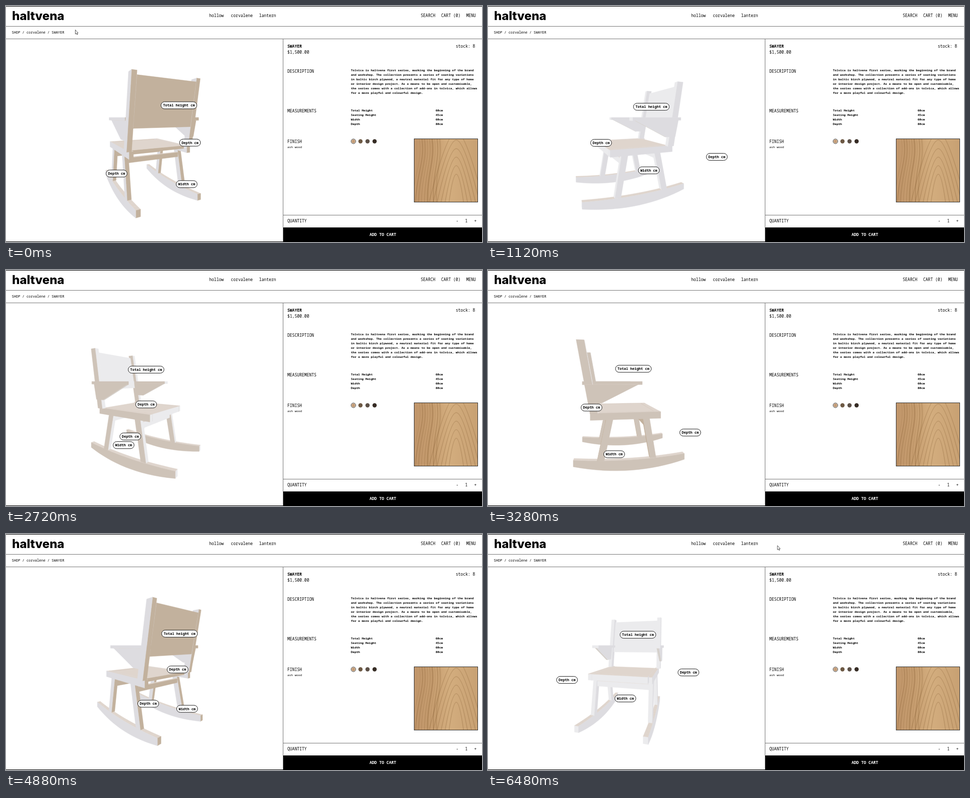
These frames come from a looping animation (944x470 px, 6.56 s). An HTML page:

```html
<!DOCTYPE html>
<html lang="en">
<head>
<meta charset="utf-8">
<title>haltvena</title>
<style>
  html, body { margin: 0; width: 100%; height: 100%; overflow: hidden; background: #fff; }
  svg { display: block; width: 944px; height: 470px; }
  text { font-family: "Noto Sans Mono", "DejaVu Sans Mono", monospace; }
  #logo { font: 800 24px Inter, sans-serif; letter-spacing: -0.1px; }
  #chair path { stroke-width: .5; stroke-linejoin: round; }
  #tags rect { fill: #fff; stroke: #222; }
</style>
</head>
<body>
<svg viewBox="0 0 944 470">
  <defs>
    <linearGradient id="wood">
      <stop offset="0" stop-color="#c0956a"/>
      <stop offset=".3" stop-color="#c79e70"/>
      <stop offset=".55" stop-color="#d3ad7e"/>
      <stop offset="1" stop-color="#c8a173"/>
    </linearGradient>
    <clipPath id="board"><rect x="810" y="265" width="125" height="125"/></clipPath>
  </defs>
  <g id="page">
    <path d="M0 .5H944M0 469.5H944" stroke="#000"/>
    <path d="M0 40.5H944M0 65.5H944M549.5 66V469M550 416.5H944" stroke="#777"/>
    <rect x="550" y="441" width="394" height="29"/>
    <text id="logo" x="12" y="28">haltvena</text>
    <rect x="810" y="265" width="125" height="125" fill="url(#wood)"/>
    <g id="grain" clip-path="url(#board)" fill="none" stroke="#80592f"/>
    <rect x="809.5" y="264.5" width="126" height="126" fill="none" stroke="#333"/>
    <circle cx="689" cy="269.5" r="4.7" fill="none" stroke="#333" stroke-width=".9"/>
    <circle cx="689" cy="269.5" r="3.7" fill="#c49d78"/>
    <circle cx="703" cy="269.5" r="4.2" fill="#6d5944"/>
    <circle cx="717" cy="269.5" r="4.2" fill="#5c5047"/>
    <circle cx="731" cy="269.5" r="4.2" fill="#362c25"/>
  </g>
  <g id="chair"></g>
  <g id="tags"></g>
  <path id="cursor" d="M0 0V8.5L1.9 6.8L3.3 9.6L4.6 9L3.3 6.3H5.6Z" fill="#fff" stroke="#333" stroke-width=".8"/>
</svg>
<script>
const LOOP = 6560, STEP = 80;
const $ = id => document.getElementById(id);
const label = (x, y, str, size = 8, weight = 500, fill = '#000') =>
  `<text x="${x}" y="${y}" font-size="${size}" font-weight="${weight}" fill="${fill}">${str}</text>`;

// Page text
const copy = [
  'Tolvica is haltvena first series, marking the beginning of the brand',
  'and workshop. The collection presents a series of seating variations',
  'in baltic birch plywood, a neutral material fit for any type of home',
  'or interior design project. As a means to be open and customisable,',
  'the series comes with a collection of add-ons in tolvica, which allows',
  'for a more playful and colourful design.'
];
const sizes = [['Total Height', '60cm'], ['Seating Height', '45cm'], ['Width', '60cm'], ['Depth', '80cm']];
$('page').insertAdjacentHTML('beforeend', [
  label(403, 22.4, 'hollow'), label(446, 22.4, 'corvalene'), label(502, 22.4, 'lantern'),
  label(822.5, 22.4, 'SEARCH'), label(863, 22.4, 'CART (0)'), label(912.7, 22.4, 'MENU'),
  label(11.5, 55.3, 'SHOP / corvalene / SWAYER', 6.95),
  label(558, 83, 'SWAYER', 8, 700), label(558, 95, '$1,500.00'), label(892, 83, 'stock: 8'),
  label(558, 133, 'DESCRIPTION'), label(558, 212, 'MEASUREMENTS'),
  label(558, 273, 'FINISH'), label(558, 283, 'ash wood', 6),
  ...copy.map((line, i) => label(684, 130.4 + 9 * i, line, 5.97, 600)),
  ...sizes.map(([name, size], i) =>
    label(684, 210.2 + 9 * i, name, 5.97, 600) + label(852, 210.2 + 9 * i, size, 5.97, 600)),
  label(558, 431.4, 'QUANTITY'), label(892.6, 431.4, '-'), label(910.6, 431.4, '1'), label(928.6, 431.4, '+'),
  label(721, 458, 'ADD TO CART', 8, 700, '#fff')
].join(''));

// Wood grain: bending lines on the left, nested arches on the right
let grain = '';
for (let i = 0; i < 9; i++) {
  const x = 814 + i * 5;
  grain += `<path d="M${x + 6} 265C${x + 12} 310 ${x - 4} 330 ${x - 8 + i} 391" stroke-width="${1 + i % 3}" opacity="${.18 + .1 * (i % 2)}"/>`;
}
for (let i = 0; i < 6; i++) {
  const w = 10 + i * 8, top = 335 - i * 17;
  grain += `<path d="M${888 - w} 395Q${889 - w * .3} ${top} 893 ${top}T${898 + w} 395" stroke-width="1.6" opacity=".26"/>`;
}
$('grain').innerHTML = grain;

// Chair: prisms with an outline in x (forward) and y (up), extruded from z0 to z1
const TONE = { left: '#dddce0', right: '#cec3b8', front: '#ebebed', back: '#c2b19d', top: '#dfd5cd', under: '#d5d0cb' };
const parts = [];
const prism = (layer, z0, z1, outline) => parts.push({ layer, z0, z1, outline });
const pair = (layer, z0, z1, outline) => {
  prism(layer, z0, z1, outline);
  prism(layer, -z1, -z0, outline);
};
const box = (x0, x1, y0, y1) => [[x0, y0], [x1, y0], [x1, y1], [x0, y1]];
const arc = (y, sag) => Array.from({ length: 17 }, (_, i) => {
  const u = i / 8 - 1;
  return [92 * u, y - sag * (1 - u * u)];
});

pair(0, 50, 57, [...arc(-134, 12), ...arc(-124, 5).reverse()]);
pair(1, 49, 56, [[32, -128], [42, -128], [31, -62], [20, -62]]);
pair(1, 49, 56, [[-55, -128], [-44, -128], [-30, -62], [-41, -62]]);
prism(1, -49, 49, box(25, 30, -77, -67));
prism(1, -49, 49, box(-42, -37, -74, -66));
prism(2, -50, 50, box(-58, 40, -56, -51));
prism(2, -50, 50, box(40, 50, -62, -51));
pair(2, 50, 57, box(-66, 50, -62, -51));
pair(3, 53, 61, [[-66, -51], [-54, -51], [-75, 65], [-87, 65]]);
prism(3, -53, 53, [[-72, -16], [-68, -16], [-82, 59], [-86, 59]]);
pair(3, 53, 67, box(-77, 16, -5, 0));
pair(3, 60, 64, [[-67, -34], [-48, -34], [10, -5], [-74, -5]]);

function camera(angle) {
  const c = Math.cos(angle), s = Math.sin(angle), dist = 325;
  const depth = (x, z) => x * s + z * c;
  const project = (x, y, z) => {
    const k = dist / (dist - depth(x, z));
    return [275 + k * (x * c - z * s), 222 - k * y];
  };
  return { depth, project };
}

const area = pts => pts.reduce((sum, [x, y], i) => {
  const [u, v] = pts[(i + 1) % pts.length];
  return sum + x * v - u * y;
}, 0);

function edgeTone([x0, y0], [x1, y1]) {
  if (Math.abs(x1 - x0) > Math.abs(y1 - y0)) return x1 < x0 ? TONE.top : TONE.under;
  return y1 > y0 ? TONE.front : TONE.back;
}

function drawPart({ z0, z1, outline }, project) {
  const near = outline.map(([x, y]) => project(x, y, z1));
  const far = outline.map(([x, y]) => project(x, y, z0));
  const faces = outline.map((p, i) => {
    const j = (i + 1) % outline.length;
    return [[near[i], far[i], far[j], near[j]], edgeTone(p, outline[j])];
  });
  faces.push([near, TONE.right], [[...far].reverse(), TONE.left]);
  return faces.filter(([pts]) => area(pts) < 0).map(([pts, tone]) =>
    `<path d="M${pts.map(p => p.map(v => v.toFixed(2))).join('L')}Z" fill="${tone}" stroke="${tone}"/>`).join('');
}

function drawChair({ depth, project }) {
  const middle = p => depth(p.outline.reduce((sum, q) => sum + q[0], 0) / p.outline.length, (p.z0 + p.z1) / 2);
  $('chair').innerHTML = [...parts]
    .sort((a, b) => a.layer - b.layer || middle(a) - middle(b))
    .map(p => drawPart(p, project)).join('');
}

// Measurement tags: each hangs by its left end from a point at a bearing and radius
const rad = deg => deg * Math.PI / 180;
const tags = [
  ['Total height cm', 137, 33, 23.3],
  ['Depth cm', 67.5, 134, -65.5],
  ['Depth cm', -136, 142, -65.4],
  ['Width cm', 137, 62, -123.5]
].map(([str, bearing, radius, y]) => {
  const width = str.length * 4.2 + 8;
  $('tags').insertAdjacentHTML('beforeend',
    `<g><rect x=".5" y="-7" width="${width}" height="14" rx="7"/>${label(4.5, 2.4, str, 7, 700)}</g>`);
  return { node: $('tags').lastChild, x: radius * Math.cos(rad(bearing)), y, z: radius * Math.sin(rad(bearing)) };
});

function draw(t) {
  const view = camera(rad(244.5 - .0769 * t));
  drawChair(view);
  for (const { node, x, y, z } of tags)
    node.setAttribute('transform', `translate(${view.project(x, y, z)})`);
  const ending = t >= LOOP - 2 * STEP;
  $('cursor').setAttribute('transform', ending ? 'translate(574 23)' : 'translate(137.5 47.5)');
  $('cursor').style.display = ending || t < 2 * STEP ? '' : 'none';
}

const start = performance.now();
function tick() {
  const t = (performance.now() - start) % LOOP;
  draw(Math.floor(t / STEP) * STEP);
  requestAnimationFrame(tick);
}
tick();
</script>
</body>
</html>
```
